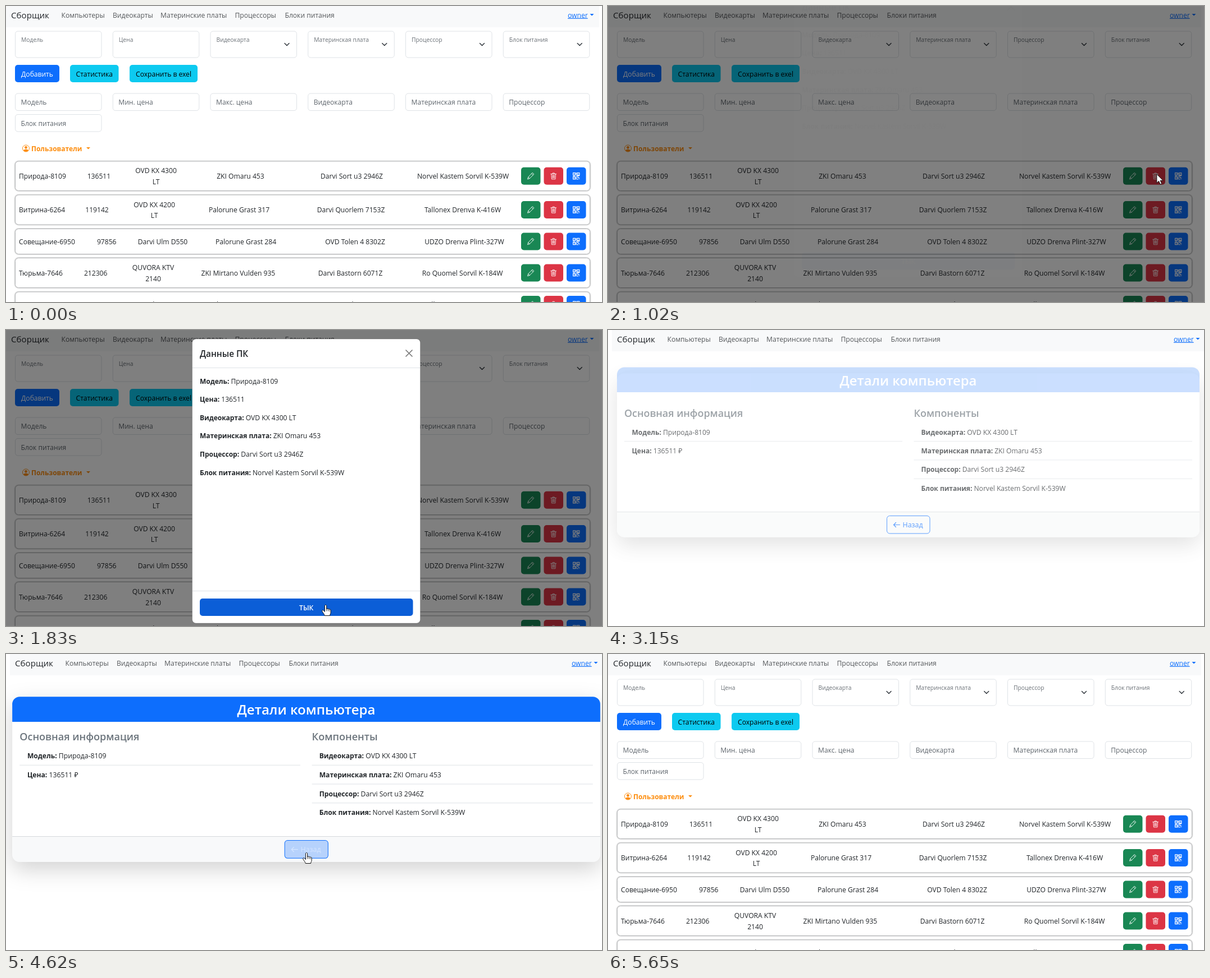
These frames come from a looping animation (1061x528 px, 6.26 s). An HTML page:

```html
<!DOCTYPE html>
<html lang="ru">
<head>
<meta charset="utf-8">
<title>Сборщик</title>
<style>
  html, body { margin: 0; width: 100%; height: 100%; overflow: hidden; background: #fff; }
  svg { display: block; width: 1061px; height: 528px; }
  text { font: 12.1px "Open Sans", "Noto Sans", sans-serif; fill: #212529; white-space: pre; }
  .bold { font-weight: 700; font-size: 12px; }
  .line { fill: none; stroke-linecap: round; stroke-linejoin: round; }
</style>
</head>
<body>
<svg id="stage" viewBox="0 0 1061 528" xmlns="http://www.w3.org/2000/svg"></svg>
<script>
const LOOP = 6260;
const BLUE = '#0d6efd', BLUE_HOVER = '#0b5ed7', BLUE_DOWN = '#0a58ca';
const GREY = '#5f666d', BORDER = '#dee2e6';

// Markup helpers
const text = (x, y, s, attrs = '') => `<text x="${x}" y="${y}" ${attrs}>${s}</text>`;
const mid = (x, y, s, attrs = '') => text(x, y, s, `text-anchor="middle" ${attrs}`);
const size = (px, weight = 400, fill = '#212529') =>
  `style="font-size:${px}px;font-weight:${weight};fill:${fill}"`;
const color = fill => `style="fill:${fill}"`;
const box = (x, y, w, h, r, attrs) =>
  `<rect x="${x}" y="${y}" width="${w}" height="${h}" rx="${r}" ${attrs}/>`;
const rule = (x1, x2, y, stroke = BORDER) =>
  `<path d="M${x1} ${y}H${x2}" stroke="${stroke}"/>`;
const group = (id, body, attrs = '') => `<g id="${id}" ${attrs}>${body}</g>`;
const pair = (x, y, label, value) =>
  `<text x="${x}" y="${y}"><tspan class="bold">${label}:</tspan> ${value}</text>`;
const caret = (x, y, fill) => `<path d="M${x - 3.5} ${y}h7l-3.5 3.6z" fill="${fill}"/>`;
const icon = (cx, cy, body) =>
  `<g transform="translate(${cx - 6.5} ${cy - 6.5}) scale(.81)">${body}</g>`;
const stroked = (d, w = 1.1) =>
  `<path class="line" d="${d}" stroke="#fff" stroke-width="${w}"/>`;

const PENCIL = stroked('M12 1l3 3L5.5 13.5 1 15l1.5-4.500zM10 3l3 3M2.5 10.500l3 3');
const TRASH = stroked('M2 3.500h12M6 3.500V1.500h4v2M3.200 3.500l.8 11.500h8l.8-11.500M6 6v6.500M8 6v6.500M10 6v6.500');
const TILES = stroked('M1 1h5v5h-5zM10 1h5v5h-5zM1 10h5v5h-5zM10 10h2v2h3M10 15h2M14.500 14.500h.5' +
  'M3.500 3.500h.1M12.500 3.500h.1M3.500 12.500h.1M8 1v4M8 7.500h7M1 8h4M8 10v5', 1.4);

const pc = {
  model: 'Природа-8109', price: '136511', gpu: 'OVD KX 4300 LT',
  board: 'ZKI Omaru 453', cpu: 'Darvi Sort u3 2946Z', psu: 'Norvel Kastem Sorvil K-539W'
};

function nav() {
  const links = [[98.5, 'Компьютеры'], [190, 'Видеокарты'], [275, 'Материнские платы'],
    [407.5, 'Процессоры'], [496.5, 'Блоки питания']];
  return box(0, 0, 1056, 38, 0, 'fill="#f8f9fa"') +
    text(9, 22, 'Сборщик', size(15.1)) +
    links.map(([x, s]) => text(x, 20.5, s, color('#55585b'))).join('') +
    text(1000, 20.5, 'owner', `style="fill:${BLUE};text-decoration:underline"`) +
    caret(1043, 14, BLUE);
}

function form() {
  const col = i => 16.5 + i * 173.75;
  const frame = (x, y, h) => box(x, y, 153.5, h, 4.5, `fill="#fff" stroke="${BORDER}"`);
  const top = ['Модель', 'Цена', 'Видеокарта', 'Материнская плата', 'Процессор', 'Блок питания'];
  const filters = ['Модель', 'Мин. цена', 'Макс. цена', 'Видеокарта', 'Материнская плата', 'Процессор', 'Блок питания'];
  const buttons = [[16, 79, BLUE, '#fff', 'Добавить'], [114, 86.5, '#0dcaf0', '#000', 'Статистика'],
    [220, 121, '#0dcaf0', '#000', 'Сохранить в exel']];
  return top.map((s, i) => {
    const x = col(i);
    const arrow = `<path class="line" d="M${x + 132} 66.500l4 4 4-4" stroke="#343a40" stroke-width="1.500"/>`;
    return frame(x, 45, 47) + text(x + 10.5, 63.5, s, size(10.3, 400, '#6c7278')) + (i > 1 ? arrow : '');
  }).join('') +
  buttons.map(([x, w, fill, ink, s]) =>
    box(x, 105, w, 31, 5, `fill="${fill}"`) + mid(x + w / 2, 125.5, s, color(ink))).join('') +
  filters.map((s, i) => {
    const x = col(i % 6), y = i < 6 ? 156 : 193.5;
    return frame(x, y, 30.5) + text(x + 10, y + 20, s, color(GREY));
  }).join('');
}

function users() {
  const c = '#fd8d0e';
  return icon(35.5, 254, `<circle cx="8" cy="8" r="7.400" fill="none" stroke="${c}" stroke-width="1.200"/>
    <circle cx="8" cy="6" r="3" fill="${c}"/><path d="M2.500 13c1.500-4 9.500-4 11 0-3 3-8 3-11 0z" fill="${c}"/>`) +
    text(45, 258.5, 'Пользователи', `class="bold" ${color(c)}`) + caret(146.5, 252, c);
}

function rows() {
  // top, height, column shift, then the cell texts
  const data = [
    [277, 52.5, 3, pc.model, pc.price, ['OVD KX 4300', 'LT'], pc.board, pc.cpu, pc.psu],
    [337, 53, 0, 'Витрина-6264', '119142', ['OVD KX 4200', 'LT'], 'Palorune Grast 317', 'Darvi Quorlem 7153Z', 'Tallonex Drenva K-416W'],
    [397.5, 45, 15, 'Совещание-6950', '97856', ['Darvi Ulm D550'], 'Palorune Grast 284', 'OVD Tolen 4 8302Z', 'UDZO Drenva Plint-327W'],
    [449.5, 53, -2, 'Тюрьма-7646', '212306', ['QUVORA KTV', '2140'], 'ZKI Mirtano Vulden 935', 'Darvi Bastorn 6071Z', 'Ro Quomel Sorvil K-184W'],
    [510, 45, 0, 'Ворона-3127', '104380', ['Darvi Ulm D350'], 'Palorune Grast 176', 'Darvi Quorlem 4415Z', 'Tallonex Drenva K-605W']
  ];
  return data.map(([y, h, d, model, price, gpu, board, cpu, psu], i) => {
    const c = y + h / 2, base = c + 4.7;
    const button = (x, fill, art, id = '') =>
      box(x, c - 15.5, 34.5, 31, 5, `fill="${fill}" ${id}`) + icon(x + 17.2, c, art);
    return box(15.5, y - .5, 1025, h + 1, 7, 'fill="none" stroke="#000" stroke-opacity=".13" stroke-width="2"') +
      box(16.5, y, 1023, h, 6, 'fill="#fff" stroke="#b4b6b8"') +
      text(23, base, model) +
      mid(162 + d * 1.15, base, price) +
      gpu.map((s, k) => mid(264 + d, base + (gpu.length > 1 ? k * 19.5 - 9.7 : 0), s)).join('') +
      mid(415 + d * .8, base, board) + mid(614 + d * .5, base, cpu) + mid(813 + d * .2, base, psu) +
      button(917, '#198754', PENCIL) + button(957.5, '#dc3545', TRASH) +
      button(998, BLUE, TILES, i ? '' : 'id="codeBtn"');
  }).join('');
}

function modal() {
  const lines = [['Модель', pc.model], ['Цена', pc.price], ['Видеокарта', pc.gpu],
    ['Материнская плата', pc.board], ['Процессор', pc.cpu], ['Блок питания', pc.psu]];
  return box(331.5, 16, 406, 507, 6.5, 'fill="#fff" stroke="#000" stroke-opacity=".18"') +
    text(345, 48, 'Данные ПК', size(15.3, 600)) +
    '<path class="line" d="M712 36l11 11M723 36l-11 11" stroke="#7a7a7a" stroke-width="1.700"/>' +
    rule(332, 737, 67.5) + rule(332, 737, 465.5) +
    lines.map(([k, v], i) => pair(345, 95.5 + i * 32.6, k, v)).join('') +
    box(345, 479, 379.5, 31, 5, `id="goBtn" fill="${BLUE}"`) +
    mid(534.7, 499.5, 'ТЫК', size(12.1, 600, '#fff'));
}

function details() {
  const parts = [['Видеокарта', pc.gpu], ['Материнская плата', pc.board],
    ['Процессор', pc.cpu], ['Блок питания', pc.psu]];
  const head = s => size(17.9, 600, '#6c757d');
  return box(16, 77.5, 1037, 292, 13, 'fill="#000" fill-opacity=".175" filter="url(#soft)" transform="translate(0 13)"') +
    box(16, 77.5, 1037, 292, 13, 'fill="#fff"') +
    text(29, 154.5, 'Основная информация', head()) + text(544.5, 154.5, 'Компоненты', head()) +
    pair(42.5, 186.5, 'Модель', pc.model) + rule(29, 524, 198.5) +
    pair(42.5, 220, 'Цена', pc.price + ' ₽') +
    parts.map(([k, v], i) => pair(557.5, 186.5 + i * 33.4, k, v) +
      (i < 3 ? rule(544.5, 1040, 198.5 + i * 33.4) : '')).join('') +
    '<path d="M16 324.500H1053V356.500a13 13 0 0 1-13 13H29a13 13 0 0 1-13-13z" fill="#f8f9fa"/>' +
    rule(16, 1053, 324.5, '#d5d8dc') +
    box(496.5, 331.5, 76.5, 31.5, 5, `id="backBtn" fill="${BLUE}" stroke="${BLUE}"`) +
    '<path id="backArrow" class="line" d="M519.500 347.500h-11m4-4l-4 4 4 4" stroke-width="1.200"/>' +
    text(524.5, 352, 'Назад', 'id="backText" style="font-size:12.4px;fill:inherit"') +
    group('head', `<path d="M16 122V90.500a13 13 0 0 1 13-13H1040a13 13 0 0 1 13 13V122z" fill="${BLUE}"/>` +
      mid(534.5, 109.5, 'Детали компьютера', size(23.8, 600, '#fff')));
}

const cursors =
  group('arrow', '<path d="M0 0V15.500L3.600 12.200 6.200 18 8.800 16.900 6.300 11.200H11.200z" fill="#fff" stroke="#111" stroke-linejoin="round"/>') +
  group('hand', `<path d="M-1.600 1c0-2 3.200-2 3.200 0v6c.3-1.600 2.700-1.400 2.800.3.600-1.200 2.400-.9 2.500.6.700-1 2.200-.5 2.200 1V13
    c0 2-1.400 3-1.600 5.500H-1.800C-2 16-5 13.500-6.200 10.800-6.900 9 -4.900 8-3.600 9.500L-1.600 11.500z" fill="#fff" stroke="#111" stroke-linejoin="round"/>
    <path d="M1.600 7v3.500M4.400 7.500v3M6.900 8.500v2.500" stroke="#111" stroke-width=".8"/>`);

document.getElementById('stage').innerHTML =
  '<defs><filter id="soft" x="-20%" y="-40%" width="140%" height="180%"><feGaussianBlur stdDeviation="19"/></filter></defs>' +
  box(0, 0, 1061, 528, 0, 'fill="#fff"') +
  group('nav', nav()) +
  group('list', form() + group('rows', users() + rows())) +
  box(0, 0, 1061, 528, 0, 'id="shade" fill="#000"') +
  group('modal', modal()) + group('card', details()) + cursors;

// Motion helpers
const el = {};
document.querySelectorAll('[id]').forEach(n => { el[n.id] = n; });
const set = (n, attrs) => { for (const k in attrs) n.setAttribute(k, attrs[k]); };
const show = (n, on) => n.setAttribute('display', on ? 'inline' : 'none');
const between = (t, a, b) => t >= a && t < b;
const ramp = (t, start, dur) => Math.min(1, Math.max(0, (t - start) / dur));
const mix = (a, b, p) => a + (b - a) * p;

function bezier(x1, y1, x2, y2) {
  const at = (a, b, u) => 3 * a * u * (1 - u) ** 2 + 3 * b * u * u * (1 - u) + u ** 3;
  return x => {
    let lo = 0, hi = 1;
    for (let i = 0; i < 24; i++) {
      const u = (lo + hi) / 2;
      if (at(x1, x2, u) < x) lo = u; else hi = u;
    }
    return at(y1, y2, (lo + hi) / 2);
  };
}
const ease = bezier(.25, .1, .25, 1);
const easeOut = bezier(0, 0, .58, 1);

// Pointer trips: time, x, y
const trips = [
  [[70, 1027, 532], [180, 1026, 430], [290, 1024, 325], [390, 1023, 301], [930, 1023, 301],
    [1020, 978, 300], [1180, 800, 312], [1370, 628, 348], [1520, 590, 412], [1680, 571, 474],
    [1800, 569, 491], [2660, 569, 491], [2900, 573, 535]],
  [[3900, 564, 532], [4020, 557, 500], [4200, 541, 448], [4400, 535, 376], [4520, 535, 355],
    [5180, 535, 355], [5400, 540, 450], [5630, 547, 535]]
];

function pointer(t) {
  for (const trip of trips) {
    for (let i = 1; i < trip.length; i++) {
      const [t0, x0, y0] = trip[i - 1], [t1, x1, y1] = trip[i];
      if (between(t, t0, t1)) {
        const p = ramp(t, t0, t1 - t0);
        return [mix(x0, x1, p), mix(y0, y1, p)];
      }
    }
  }
  return null;
}

function draw(t) {
  const onCard = between(t, 2920, 4940);
  const modalOn = between(t, 1020, 2920);

  show(el.list, !onCard);
  show(el.card, onCard);
  show(el.modal, modalOn);
  set(el.nav, { transform: `translate(${onCard ? 7 : 0} 0)` });
  set(el.rows, { opacity: between(t, 4940, 5650) ? ease(ramp(t, 5080, 540)) : 1 });

  set(el.shade, { opacity: t < 2920 ? .5 * ramp(t, 855, 150) : 0 });
  set(el.modal, {
    opacity: ramp(t, 1020, 150),
    transform: `translate(0 ${-40 * (1 - easeOut(ramp(t, 1020, 300)))})`
  });
  set(el.codeBtn, { fill: between(t, 770, 900) ? BLUE_DOWN : between(t, 300, 770) ? BLUE_HOVER : BLUE });
  set(el.goBtn, { fill: between(t, 2630, 2720) ? BLUE_DOWN : between(t, 1690, 2860) ? BLUE_HOVER : BLUE });

  const slide = ease(ramp(t, 2950, 950));
  const scale = 1 + .02 * ease(ramp(t, 4510, 400));
  set(el.card, {
    opacity: ease(ramp(t, 2950, 520)),
    transform: `translate(534.5 223.5) scale(${scale}) translate(-534.5 -223.5)`
  });
  set(el.head, { opacity: slide, transform: `translate(0 ${-16.2 * (1 - slide)})` });

  const fill = ease(ramp(t, 4550, 370));
  const ink = Math.min(1, fill * 3);
  const tone = `rgb(${mix(13, 255, ink)},${mix(110, 255, ink)},${mix(253, 255, ink)})`;
  set(el.backBtn, { 'fill-opacity': fill });
  set(el.backArrow, { stroke: tone });
  el.backText.style.fill = tone;

  const at = pointer(t);
  const hand = between(t, 300, 860) || between(t, 1690, 2860) || between(t, 4440, 4940);
  show(el.arrow, at && !hand);
  show(el.hand, at && hand);
  if (at) set(hand ? el.hand : el.arrow, { transform: `translate(${at[0]} ${at[1]})` });
}

const start = performance.now();
function tick() {
  draw((performance.now() - start) % LOOP);
  requestAnimationFrame(tick);
}
tick();
</script>
</body>
</html>
```
